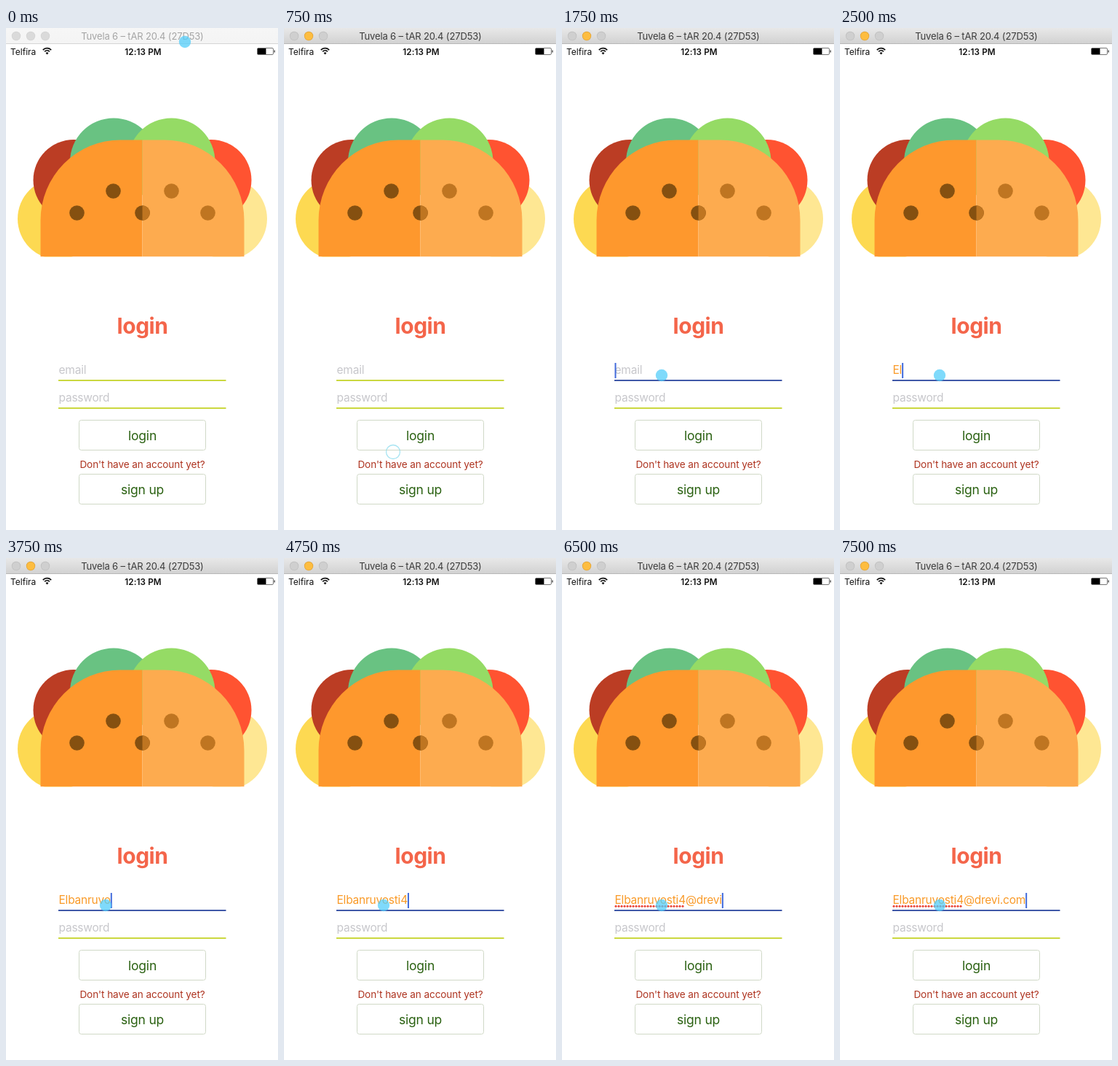
Write an HTML page with a canvas that moves like this. It is 374x688 px and loops after 8000 ms.

```html
<!DOCTYPE html>
<html lang="en">
<head>
<meta charset="utf-8">
<title>Login</title>
<style>
html, body { margin: 0; width: 100%; height: 100%; overflow: hidden; background: #fff; }
canvas { display: block; width: 374px; height: 688px; }
</style>
</head>
<body>
<canvas id="stage"></canvas>
<script>
const W = 374, H = 688, LOOP = 8000;
const canvas = document.getElementById('stage');
const ctx = canvas.getContext('2d');
const ratio = window.devicePixelRatio || 1;
canvas.width = W * ratio;
canvas.height = H * ratio;

const EMAIL = 'Elbanruvosti4@drevi.com';
const NAME_LENGTH = EMAIL.indexOf('@');
const FIELD_X = 72.5;
const FIELD_FONT = { size: 15.5, spacing: -0.22 };

// [start time, characters typed]
const typing = [
  [0, 0], [2250, 1], [2500, 2], [2750, 4], [3000, 5], [3500, 7], [3750, 9],
  [4000, 11], [4250, 12], [4750, 13], [5250, 14], [5750, 15], [6000, 17],
  [6250, 18], [6500, 19], [7000, 20], [7250, 21], [7500, 23]
];

// [start time, x, y, pressed]
const pointer = [
  [0, 246, 19, true], [250, 243, 26, false], [500, 196, 330, false],
  [750, 150, 581, false], [1000, 133, 496, false], [1250, 134, 497, false],
  [1500, 137, 476, false], [1750, 137, 476, true]
];

const stepAt = (steps, t) => steps.filter(s => s[0] <= t).pop();

function disc(x, y, r, color) {
  ctx.fillStyle = color;
  ctx.beginPath();
  ctx.arc(x, y, r, 0, Math.PI * 2);
  ctx.fill();
}

function rect(x, y, w, h, color) {
  ctx.fillStyle = color;
  ctx.fillRect(x, y, w, h);
}

function setFont({ size, weight = 400, spacing = 0 }) {
  ctx.font = `${weight} ${size}px Inter, sans-serif`;
  ctx.letterSpacing = spacing + 'px';
}

function text(str, x, y, color, font, align = 'left') {
  setFont(font);
  ctx.textAlign = align;
  ctx.fillStyle = color;
  ctx.fillText(str, x, y);
}

function titleBar(active) {
  const g = ctx.createLinearGradient(0, 0, 0, 22);
  g.addColorStop(0, active ? '#e8e8e8' : '#f6f6f6');
  g.addColorStop(1, active ? '#d1d1d1' : '#f4f4f4');
  rect(0, 0, W, 22, g);
  rect(0, 21, W, 1, active ? '#b8b8b8' : '#d5d5d5');
  [14, 34, 54].forEach((x, i) => {
    const lit = active && i === 1;
    disc(x, 11, 6.2, lit ? '#dfa035' : active ? '#bdbdbd' : '#d2d2d2');
    disc(x, 11, 5.5, lit ? '#fdbd40' : active ? '#cfcfcf' : '#dadada');
  });
  text('Tuvela 6 – tAR 20.4 (27D53)', 187.5, 16, active ? '#3c3c3c' : '#a5a5a5',
    { size: 13, spacing: -0.15 }, 'center');
}

function statusBar() {
  text('Telfira', 6, 36.5, '#111', { size: 12 });

  ctx.strokeStyle = '#111';
  ctx.lineWidth = 1.8;
  for (const r of [4.6, 7.8]) {
    ctx.beginPath();
    ctx.arc(56.5, 35.5, r, -Math.PI * 0.76, -Math.PI * 0.24);
    ctx.stroke();
  }
  ctx.fillStyle = '#111';
  ctx.beginPath();
  ctx.moveTo(56.5, 36.5);
  ctx.arc(56.5, 36, 2.6, -Math.PI * 0.76, -Math.PI * 0.24);
  ctx.fill();

  text('12:13 PM', 188.5, 36.5, '#111', { size: 11.7, weight: 600, spacing: 0.1 }, 'center');

  ctx.strokeStyle = '#777';
  ctx.lineWidth = 1;
  ctx.beginPath();
  ctx.roundRect(345.5, 27.5, 22, 9, 1.5);
  ctx.stroke();
  rect(346, 28, 11.5, 8, '#000');
  rect(368.5, 30.5, 1.5, 3, '#555');
}

function shellPath() {
  const left = 47.5, right = 327.5, top = 153.5, bottom = 313.5, r = 110;
  ctx.beginPath();
  ctx.moveTo(left, bottom);
  ctx.arcTo(left, top, left + r, top, r);
  ctx.arcTo(right, top, right, top + r, r);
  ctx.lineTo(right, bottom);
  ctx.closePath();
}

function taco() {
  const mid = 187.5;
  ctx.save();
  ctx.beginPath();
  ctx.rect(0, 100, W, 213.5);
  ctx.clip();
  disc(71.5, 261.5, 55.5, '#fdd952');
  disc(303.5, 261.5, 55.5, '#fee793');
  disc(93, 208.5, 55.5, '#bb3d24');
  disc(282, 208.5, 55.5, '#ff5331');
  disc(148, 183.5, 60, '#69c282');
  disc(227.5, 183.5, 60, '#95db65');

  shellPath();
  ctx.clip();
  rect(0, 150, mid, 170, '#fe982d');
  rect(mid, 150, mid, 170, '#fdab4f');
  ctx.restore();

  disc(97.5, 253.5, 10.3, '#855010');
  disc(147.5, 223.5, 10.3, '#855010');
  disc(227.5, 223.5, 10.3, '#bf7521');
  disc(277.5, 253.5, 10.3, '#bf7521');
  disc(mid, 253.5, 10.3, '#855010');
  ctx.fillStyle = '#bf7521';
  ctx.beginPath();
  ctx.arc(mid, 253.5, 10.3, -Math.PI / 2, Math.PI / 2);
  ctx.fill();
}

function button(label, y) {
  ctx.strokeStyle = '#d0d9c7';
  ctx.lineWidth = 1;
  ctx.beginPath();
  ctx.roundRect(100.5, y + 0.5, 174, 41, 3);
  ctx.stroke();
  text(label, 187.5, y + 27.5, '#2a6111', { size: 17.5, spacing: -0.2 }, 'center');
}

function field(placeholder, y, value, focused) {
  text(value || placeholder, FIELD_X, y, value ? '#f99a28' : '#c7c7cb', FIELD_FONT);
  rect(72, y + 8, 230.5, 2, focused ? '#4059a8' : '#cbd840');
}

function textWidth(str) {
  setFont(FIELD_FONT);
  return ctx.measureText(str).width;
}

function spellMarks() {
  const end = FIELD_X + textWidth(EMAIL.slice(0, NAME_LENGTH));
  for (let x = 74; x < end; x += 4) disc(x, 477.2, 1.5, '#ea4335');
}

function drawPointer([, x, y, pressed]) {
  if (pressed) {
    disc(x, y, 8.2, 'rgba(82, 205, 250, 0.74)');
    return;
  }
  ctx.strokeStyle = 'rgba(120, 214, 235, 0.65)';
  ctx.lineWidth = 1.3;
  ctx.beginPath();
  ctx.arc(x, y, 9.5, 0, Math.PI * 2);
  ctx.stroke();
}

function draw(t) {
  const value = EMAIL.slice(0, stepAt(typing, t)[1]);
  const focused = t >= 1750;

  ctx.setTransform(ratio, 0, 0, ratio, 0, 0);
  rect(0, 0, W, H, '#fff');
  titleBar(t >= 250);
  statusBar();
  taco();
  text('login', 187.5, 419, '#f4654a', { size: 30, weight: 700, spacing: -0.5 }, 'center');

  field('email', 474, value, focused);
  field('password', 512, '', false);
  if (t >= 5500) spellMarks();
  if (focused) rect(FIELD_X + textWidth(value), 459, 2, 21, '#426bdb');

  button('login', 537);
  text("Don't have an account yet?", 187.5, 602.5, '#ae3420', { size: 13.6, spacing: -0.1 }, 'center');
  button('sign up', 611);
  drawPointer(stepAt(pointer, t));
}

const start = performance.now();
function tick() {
  draw((performance.now() - start) % LOOP);
  requestAnimationFrame(tick);
}
tick();
</script>
</body>
</html>
```
